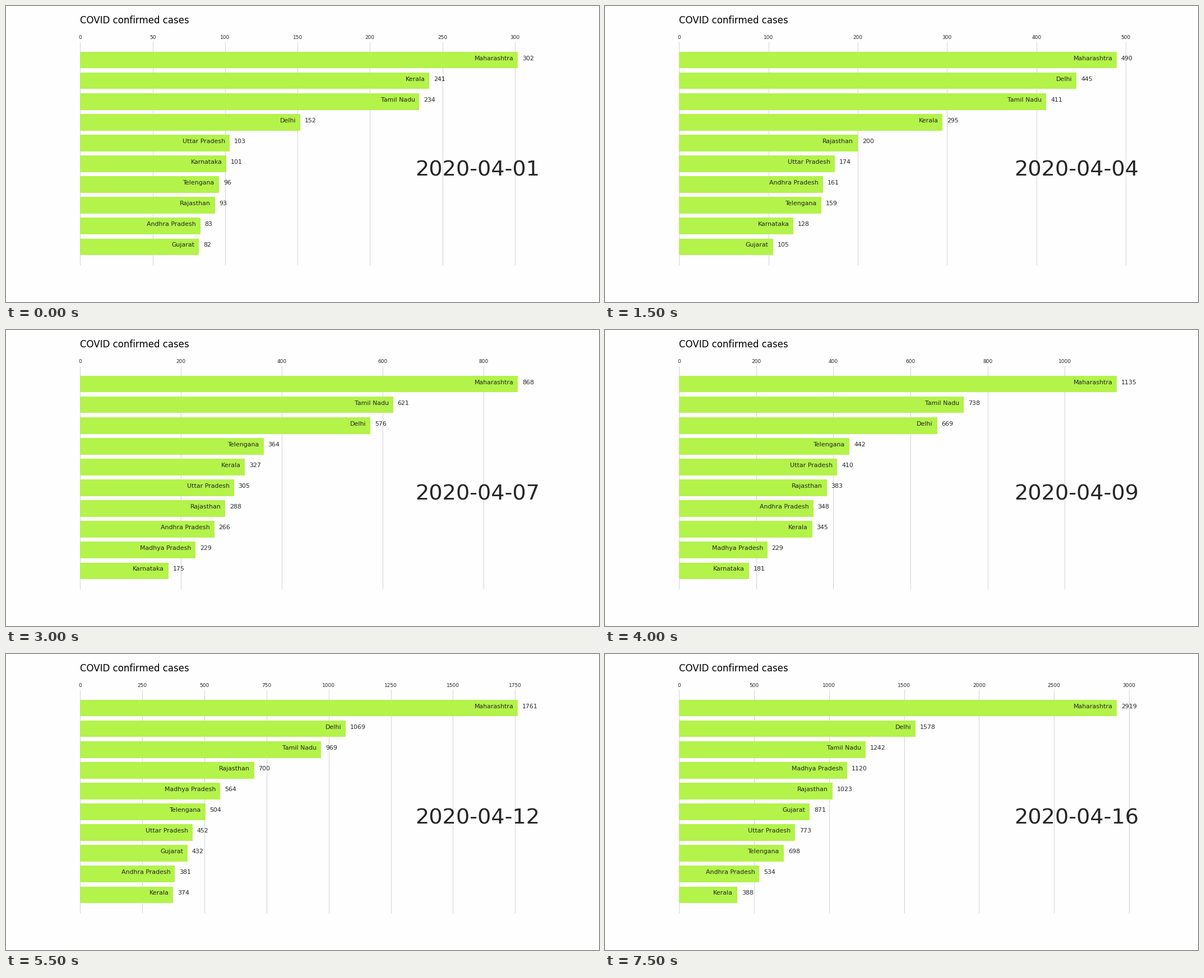
These frames come from a looping animation (1058 px wide and 529 px high, 8 s). A matplotlib script:

```python
import matplotlib.pyplot as plt
from matplotlib.animation import FuncAnimation
from matplotlib.patches import Rectangle
from matplotlib.ticker import MaxNLocator

W, H, DPI = 1058, 529, 64
LEFT, RIGHT, TOP, BOTTOM = 132.25, 952.2, 63.5, 463.4
PITCH = (BOTTOM - TOP) / (9.8 * 1.1)
FIRST = TOP + 0.89 * PITCH  # centre of the top bar
BACK, LIME, GRID, INK = "#fefefe", "#b3f34a", "#d3d3d3", "#262626"

plt.rcParams["font.family"] = "DejaVu Sans"

# Daily counts from 1 April; a gap keeps the count of the day before.
_ = None
CASES = {
    "Maharashtra": [302, 335, _, 490, _, 748, 868, 1018, 1135, 1364,
                    1574, 1761, 1985, 2337, 2687, 2919],
    "Kerala": [241, 265, 286, 295, 306, 314, 327, 336, 345, 357,
               364, 374, 376, 379, 387, 388],
    "Tamil Nadu": [234, _, 309, 411, 485, 571, 621, 690, 738, 834,
                   911, 969, 1043, 1173, 1204, 1242],
    "Delhi": [152, _, 219, 445, 503, 523, 576, _, 669, 898,
              903, 1069, 1154, 1510, 1561, 1578],
    "Uttar Pradesh": [103, 113, 172, 174, 227, 305, _, 343, 410, 431,
                      433, 452, 558, 657, 735, 773],
    "Karnataka": [101, 110, 124, 128, 144, 151, 175, _, 181, _,
                  _, _, _, _, _, _],
    "Telengana": [96, 107, 158, 159, 269, 321, 364, 427, 442, 473,
                  _, 504, 562, 624, 647, 698],
    "Rajasthan": [93, 108, 167, 200, _, 274, 288, 328, 383, 463,
                  553, 700, 812, 873, 1005, 1023],
    "Andhra Pradesh": [83, _, 132, 161, 190, 226, 266, 305, 348, 363,
                       _, 381, 432, 473, 503, 534],
    "Gujarat": [82, 87, _, 105, _, _, _, _, _, 241,
                308, 432, 539, 617, 695, 871],
    "Madhya Pradesh": [_, 99, 104, _, 165, _, 229, _, _, 259,
                       435, 564, 604, 730, 987, 1120],
}
DAYS = 16

locator = MaxNLocator(nbins=9, steps=[1, 2, 2.5, 5, 10])
fig = plt.figure(figsize=(W / DPI, H / DPI), dpi=DPI, facecolor=BACK)
ax = fig.add_axes([0, 0, 1, 1])


def count(series, day):
    known = [v for v in series[:day + 1] if v is not None]
    return known[-1] if known else 0


def label(x, y, text, px, ha="left", color=INK):
    ax.text(x, y, text, fontsize=px * 72 / DPI, ha=ha, va="baseline",
            color=color, zorder=3)


def draw(day):
    ax.clear()
    ax.set_xlim(0, W)
    ax.set_ylim(H, 0)
    ax.axis("off")

    totals = {name: count(series, day) for name, series in CASES.items()}
    ranked = sorted(totals.items(), key=lambda item: -item[1])[:10]
    limit = ranked[0][1] * 1.05
    scale = (RIGHT - LEFT) / limit
    gap = (RIGHT - LEFT) / 105

    for tick in locator.tick_values(0, limit):
        if 0 <= tick <= limit:
            x = LEFT + tick * scale
            ax.plot([x, x], [TOP, BOTTOM], color=GRID, lw=72 / DPI,
                    solid_capstyle="butt", zorder=1)
            label(x, 59, f"{tick:.0f}", 9, "center")

    for row, (name, value) in enumerate(ranked):
        y = FIRST + row * PITCH
        width = value * scale
        ax.add_patch(Rectangle((LEFT, y - 0.4 * PITCH), width, 0.8 * PITCH,
                               facecolor=LIME, linewidth=0, zorder=2))
        label(LEFT + width - gap, y, name, 11, "right")
        label(LEFT + width + gap, y, str(value), 11)

    label(LEFT, 31, "COVID confirmed cases", 16.65, color="black")
    label(RIGHT, 303.5, f"2020-04-{day + 1:02d}", 38.2, "right")
    return []


def reset():
    draw(0)
    return []


anim = FuncAnimation(fig, draw, frames=DAYS, init_func=reset, interval=500,
                     repeat=True, repeat_delay=0)
plt.show()
```
